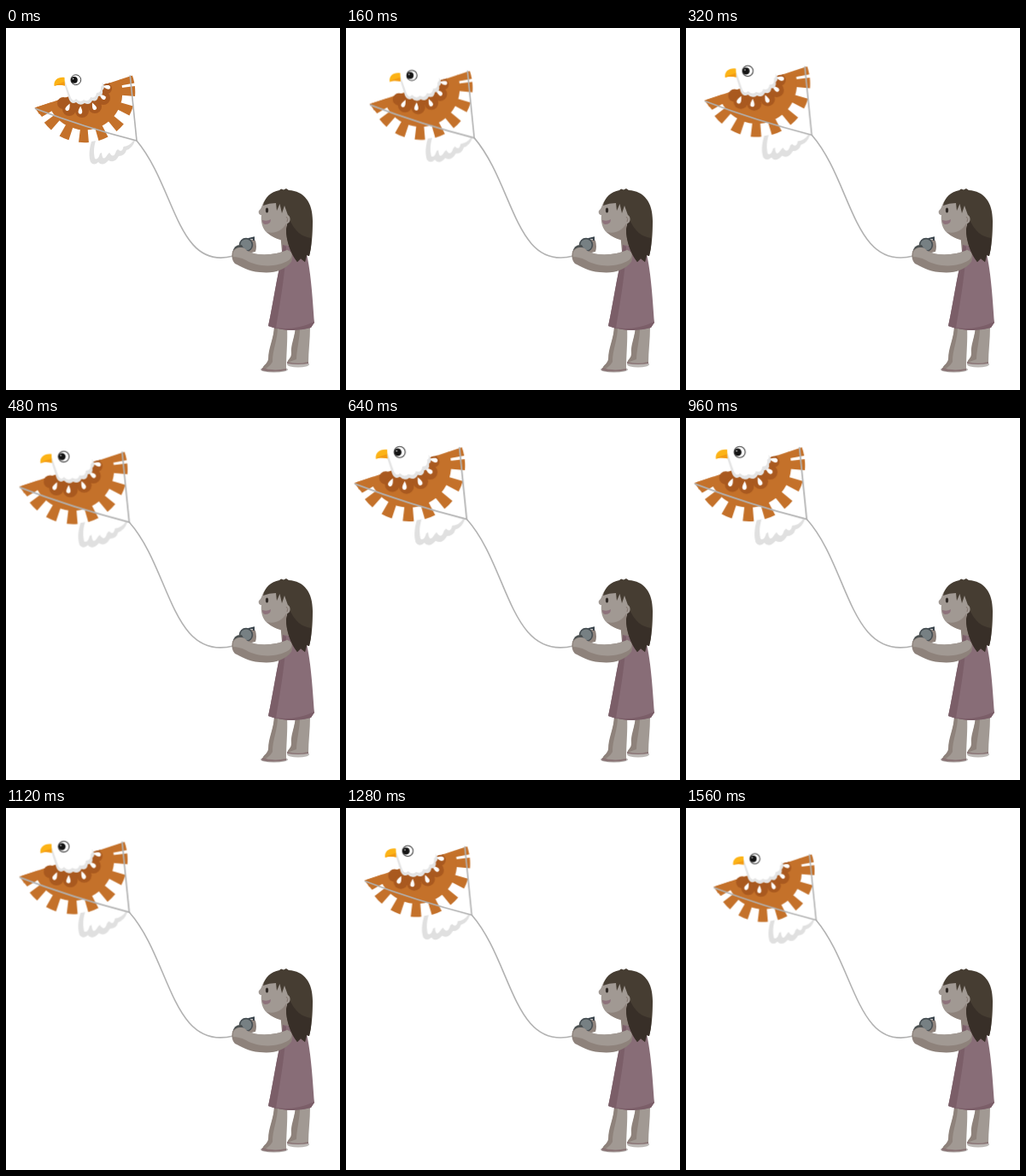
Animation, 391 px wide and 424 px high, one loop 1.6 s. Source, as an HTML page:

```html
<!DOCTYPE html>
<html lang="en">
<head>
<meta charset="utf-8">
<title>Girl flying a kite</title>
<style>
  html, body { margin: 0; width: 100%; height: 100%; overflow: hidden; background: #fff; }
  svg { display: block; width: 100vw; height: 100vh; }
  .line { fill: none; stroke: #b2b2b2; stroke-width: 1.6; stroke-linecap: round; }
  .kite { transform-origin: 153px 132px; animation: soar 1.6s steps(20) infinite; }
  .rope { animation: sway 1.6s steps(20) infinite; }
  @keyframes soar {
    50% { transform: translate(-14.6px, -16.8px) scale(1.128); }
  }
  @keyframes sway {
    0%, 100% { d: path("M153 132C199 187 200 285 266 267"); }
    50% { d: path("M138.4 115.2C189 170 188.4 285 266 267"); }
  }
  .skin { fill: #a19993; }
  .shade { fill: #8e827b; }
  .hair { fill: #463d32; }
  .dark { fill: #382f28; }
</style>
</head>
<body>
<svg viewBox="0 0 391 424">
  <defs>
    <path id="drop" d="M0 -5C2 -1 2.6 1 2.2 2.6A2.3 2.3 0 0 1 -2.2 2.6C-2.6 1 -2 -1 0 -5Z"/>
    <clipPath id="fan"><path d="M-58.5 18.5L44 -15.5L70 -24V70H-70V22.5Z"/></clipPath>
  </defs>

  <path class="line rope" d="M153 132C199 187 200 285 266 267"/>

  <g class="kite">
    <!-- tail -->
    <path fill="#e0e0e0" d="M100 133C97 143 97 151 99 157Q103 162 108 157Q113 163 120 155Q127 159 132 150Q139 150 141 143Q148 141 151 132L128 128Z"/>
    <path fill="#fff" d="M105 132C102 142 103 148 104 153Q108 155 110 147L112 146Q113 158 119 148L121 146Q126 154 129 144L131 142Q136 147 137.5 139Q145 138 149 132L128 127Z"/>

    <!-- wings: disc with a ring of feathers, cut along the top edge -->
    <g transform="translate(92 75)">
      <g clip-path="url(#fan)">
        <circle r="44.5" fill="#c4712a"/>
        <circle r="51.5" fill="none" stroke="#c4712a" stroke-width="15.5" pathLength="360" stroke-dasharray="11.5 11.5" transform="rotate(-6.7)"/>
      </g>
      <path fill="#c4712a" d="M-58.5 18.5L-50 29L-38 22L-38 11.7Z"/>
    </g>
    <g fill="#a9591f">
      <path d="M60 85L122 64L112 86L88 98L68 92Z"/>
      <circle cx="67" cy="88" r="7"/>
      <circle cx="74" cy="95" r="8"/>
      <circle cx="89" cy="97" r="8"/>
      <circle cx="104" cy="92" r="8"/>
      <circle cx="114" cy="82" r="8"/>
      <circle cx="118" cy="71" r="6"/>
    </g>
    <g fill="#fff">
      <use href="#drop" transform="translate(72.5 93) rotate(25)"/>
      <use href="#drop" transform="translate(87 96.5) rotate(3)"/>
      <use href="#drop" transform="translate(103 92) rotate(-24)"/>
      <use href="#drop" transform="translate(113 80.5) rotate(-52)"/>
      <use href="#drop" transform="translate(118 69) rotate(-78)"/>
    </g>

    <!-- head -->
    <path fill="#e4e4e4" d="M67 62L74 84Q77 90 82 87Q87 92 92 88Q98 91 101 85Q107 87 108 80Q114 80 113 73Q117 70 113 64Z"/>
    <path fill="#fff" d="M69 62L76 82Q79 87 82 83Q87 88 91 84Q97 87 99 81Q105 83 106 76Q112 76 111 69Q115 66 111 62L100 52L76 50Z"/>
    <path fill="#fcb316" d="M56.5 68C55.5 61 61 57 68.5 58L69 67.5C64 66.5 60 66.5 56.5 68Z"/>
    <path fill="#f39a13" d="M56.5 68C60 65 64 65 68 63L69 67.5C64 66.5 60 66.5 56.5 68Z"/>
    <circle cx="81.8" cy="60.7" r="5.9" fill="#fff" stroke="#3c3c3c" stroke-width="1"/>
    <circle cx="79.9" cy="60.8" r="3.9" fill="#141414"/>
    <circle cx="78.6" cy="59.5" r=".7" fill="#fff"/>

    <path class="line" d="M34.5 94.5Q92 116.5 153 132L145.3 56"/>
  </g>

  <!-- legs -->
  <g fill="#bcb8b5">
    <ellipse cx="314" cy="400" rx="16" ry="3.5"/>
    <ellipse cx="342" cy="394" rx="13" ry="3.5"/>
  </g>
  <path class="skin" d="M339 350L356 350C356 365 354 378 354 392L330 393C329 389 334 387 335 382C334 371 338 363 339 350Z"/>
  <path class="shade" d="M339 350L344 350C344 364 340 378 340 388L329 392C330 388 334 387 334 381C333 371 338 363 339 350Z"/>
  <path class="skin" d="M314 349L329 350C330 366 328 382 328 400L301 400C299 396 306 394 308 388C308 374 314 363 314 349Z"/>
  <path class="shade" d="M314 349L318 350C318 366 312 376 312 391C309 396 305 399 301 400C299 396 306 394 307 388C307 374 314 363 314 349Z"/>
  <path fill="#8a7475" d="M300 398Q312 402 328 399L328 401Q312 404 299 401ZM329 391Q342 394 354 391L354 393Q342 395 329 393Z"/>

  <!-- neck and dress -->
  <path class="shade" d="M321 240L340 240L345 262L323 262Z"/>
  <path fill="#886d77" d="M324 254L350 258C357 280 359 320 361 345Q358 349 357 351Q333 358 307 349C313 322 317 290 323 270Z"/>
  <path fill="#7b5e68" d="M324 254L328 256C327 290 320 325 316 352L307 349C313 322 317 290 323 270Z"/>
  <path fill="#7b5e68" d="M307 349Q333 357 361 344L361 345L357 351Q333 358 307 349Z"/>

  <!-- reel and arms -->
  <path class="shade" d="M284 252Q287 245 292 249Q294 256 292 262L283 264Z"/>
  <circle cx="281" cy="254" r="7.4" fill="#778083" stroke="#454d52" stroke-width="1.6"/>
  <path d="M284 247L290 245.5L290 249" fill="none" stroke="#39434b" stroke-width="2"/>
  <path fill="#4b5051" d="M265 263Q267 253 276 254L280 261L270 266Z"/>
  <path class="shade" d="M265 262C269 256 278 255 282 261C295 268 316 266 329 260C335 261 337 267 334 274C326 284 313 288 297 286C283 285 275 279 268 276Q263 270 265 262Z"/>
  <path class="skin" d="M266 263C269 256 278 255 282 261C295 268 316 266 329 260C336 262 336 268 331 272C317 281 294 280 281 272C275 269 270 268 266 268Z"/>

  <!-- head -->
  <path class="skin" d="M303 202C299 207 300 211 296 214C295 217 297 219 299 219C298 226 300 236 306 240C312 245 321 249 327 247L333 230L328 202Z"/>
  <path class="shade" d="M305 239C314 241 322 239 328 229L331 249L326 249C318 248 310 244 305 239Z"/>
  <path fill="#8d727b" d="M300 225Q306 227 310 224Q310 230 303 230Q300 229 300 225Z"/>
  <ellipse cx="305.5" cy="213.5" rx="1.6" ry="3" fill="#2d2723"/>
  <path class="hair" d="M301 208C303 198 310 192 320 190L322 188.5L325 189.5L328 188L331 190C349 191 359 204 359 226C359 242 358 255 355 267L352 266L350 274L345 270L341 274C333 264 328 249 328 236L331 222L326 208L323 217L320.5 206L317 214L316 205Q308 205 301 208Z"/>
  <path class="dark" d="M331 222C337 238 347 245 357 246C358 256 356 262 355 267L352 266L350 274L345 270L341 274C333 264 328 249 328 236Z"/>
  <ellipse cx="329" cy="224" rx="3.6" ry="5" class="skin"/>
  <path d="M328 221Q331 223 329 227" fill="none" stroke="#84766f"/>
</svg>
</body>
</html>
```
